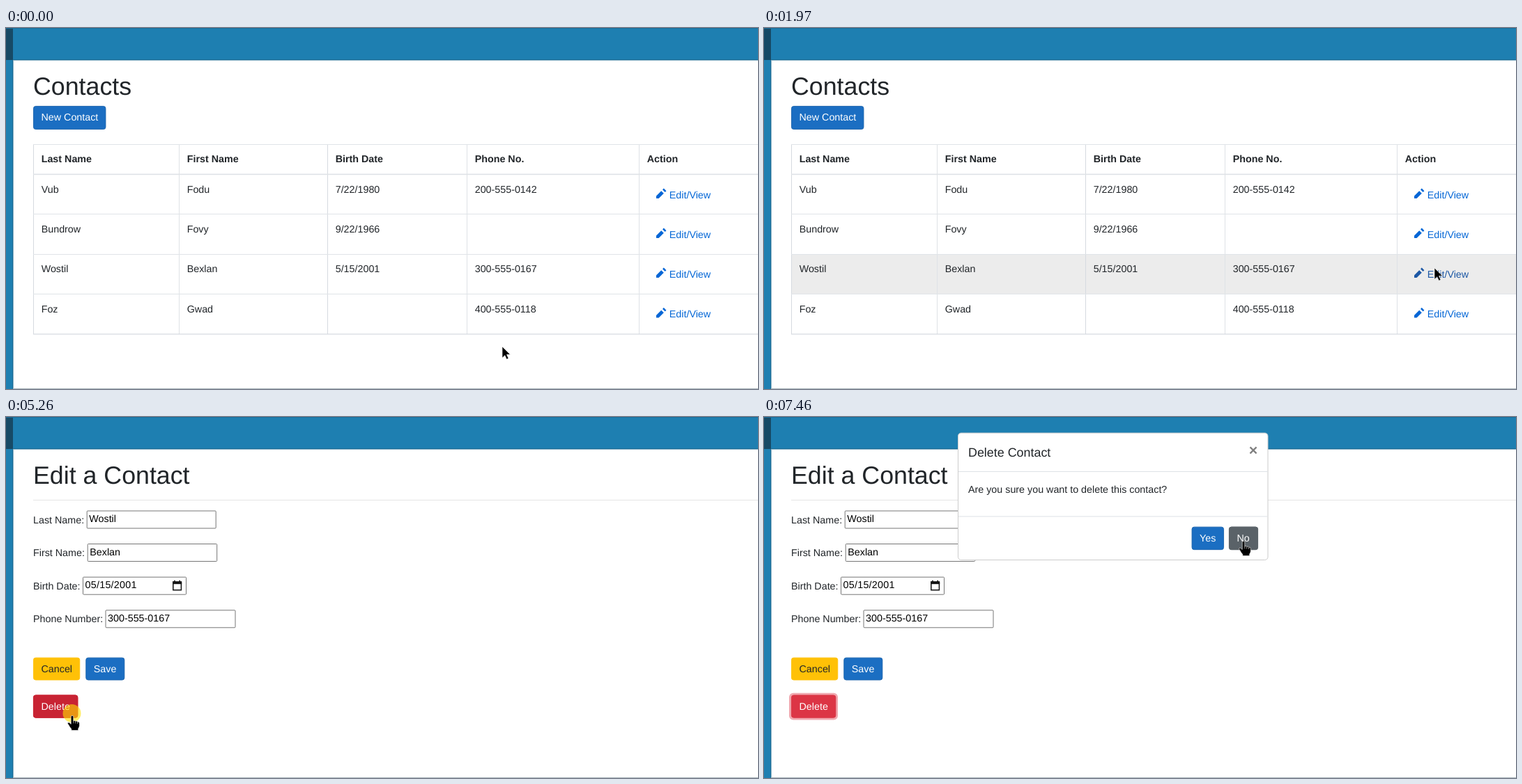
These frames come from a looping animation (1079x519 px, 8 s). An HTML page:

```html
<!DOCTYPE html>
<html lang="en">
<head>
<meta charset="utf-8">
<title>Contacts</title>
<style>
  html, body { margin: 0; width: 100%; height: 100%; overflow: hidden; background: #fff; }
  svg { display: block; width: 1079px; height: 519px; }
  text { font: 14.3px "Liberation Sans", Arial, sans-serif; fill: #212529; white-space: pre; text-rendering: geometricPrecision; }
  .h1 { font-size: 35.75px; }
  .h5 { font-size: 17.9px; }
  .bold { font-weight: bold; }
  .light { fill: #fff; }
  .field { fill: #000; }
  .date { fill: #000; letter-spacing: .25px; }
  .close { font-size: 21.5px; font-weight: bold; fill: #7f7f7f; }
  .link, .link text { fill: #0366d6; }
  .link.on, .link.on text { fill: #1d58a5; }
</style>
</head>
<body>
<svg id="stage" viewBox="0 0 1079 519"></svg>
<script>
const $ = id => document.getElementById(id);

const text = (x, y, s, cls = '') => `<text x="${x}" y="${y}" class="${cls}">${s}</text>`;
const rect = (x, y, w, h, fill, more = '') =>
  `<rect x="${x}" y="${y}" width="${w}" height="${h}" fill="${fill}" ${more}/>`;
const group = (id, body) => `<g id="${id}">${body}</g>`;

function button(x, y, w, h, label, fill, border, cls = 'light', hover = '') {
  const box = (color, more) => rect(x + .45, y + .45, w - .9, h - .9, color, `rx="3.2" ${more}`);
  return box(fill, `stroke="${border}" stroke-width=".9"`) +
    (hover && box(hover, `id="${label}Hover" stroke="${hover}" stroke-width=".9"`)) +
    text(x + 11.5, y + 21.2, label, cls);
}

function field(label, value, x, y, w, cls = 'field') {
  return text(39, y + 18, label) +
    rect(x + .5, y + .5, w - 1, 25, '#fff', 'stroke="#767676" rx="1"') +
    text(x + 3.6, y + 16.7, value, cls);
}

const columns = [39, 248, 461, 661, 908];
const rowTops = [211, 268, 325, 382.5, 440];
const people = [
  ['Vub', 'Fodu', '7/22/1980', '200-555-0142'],
  ['Bundrow', 'Fovy', '9/22/1966', ''],
  ['Wostil', 'Bexlan', '5/15/2001', '300-555-0167'],
  ['Foz', 'Gwad', '', '400-555-0118']
];
const pencil = 'M6 0l-1 1 2 2 1-1-2-2zm-2 2l-4 4v2h2l4-4-2-2z';

function listPage() {
  const heads = ['Last Name', 'First Name', 'Birth Date', 'Phone No.', 'Action'];
  let s = text(39, 96, 'Contacts', 'h1') +
    button(39, 112, 104.4, 34, 'New Contact', '#1b6ec2', '#1861ac') +
    rect(39, 325, 1040, 57, '#ececec', 'id="rowHover"');
  heads.forEach((h, i) => s += text(columns[i] + 11.7, 192.5, h, 'bold'));
  people.forEach((p, r) => {
    const y = rowTops[r];
    p.forEach((v, i) => s += text(columns[i] + 11.7, y + 26.2, v));
    s += `<g class="link" id="link${r}"><path d="${pencil}" transform="translate(933 ${y + 19.6}) scale(1.8)"/>` +
      text(951.8, y + 33.8, 'Edit/View') + '</g>';
  });
  for (const x of columns) s += rect(x, 167, 1, 273, x == 39 || x == 461 ? '#d6dae0' : '#dee2e6');
  for (const y of [167, 267, 325, 382]) s += rect(39, y, 1040, 1, '#e0e4e8');
  return s + rect(39, 209.6, 1040, 1.6, '#dee2e6') + rect(39, 439.5, 1040, 1.2, '#d6dae0');
}

function editPage() {
  const [last, first, , phone] = people[2];
  return text(39, 96, 'Edit a Contact', 'h1') +
    rect(39, 119, 1040, 1, '#e5e5e5') +
    field('Last Name:', last, 115.7, 134.5, 186) +
    field('First Name:', first, 116.7, 182, 186.5) +
    field('Birth Date:', '05/15/2001', 110, 229.7, 149, 'date') +
    field('Phone Number:', phone, 142.5, 277.3, 187) +
    '<path d="M239.8 238.5h11.6v10.2h-11.6z" fill="none" stroke="#111" stroke-width="1.5"/>' +
    rect(239, 236.2, 13.2, 4, '#111') + rect(241.2, 234.8, 1.6, 2, '#111') + rect(248.4, 234.8, 1.6, 2, '#111') +
    button(39, 345.7, 67.2, 32.8, 'Cancel', '#ffc107', '#ffc107', 'dark') +
    button(114.3, 345.7, 56, 32.8, 'Save', '#1b6ec2', '#1861ac') +
    rect(36, 396.8, 70, 38.6, '#f0a9b0', 'rx="6" id="ring"') +
    button(39, 399.5, 64.3, 33.2, 'Delete', '#dc3545', '#dc3545', 'light', '#c82333');
}

function dialogBox() {
  return rect(278.5, 23, 444.5, 182.5, '#fff', 'rx="4.3" stroke="#ccc"') +
    rect(279, 78, 443.5, 1, '#dee2e6') + rect(279, 142.5, 443.5, 1, '#dee2e6') +
    text(293, 56.5, 'Delete Contact', 'h5') + text(695.8, 54.8, '×', 'close') +
    text(293, 109, 'Are you sure you want to delete this contact?') +
    button(613.6, 157.7, 46.4, 33.4, 'Yes', '#1b6ec2', '#1861ac') +
    button(667, 157.7, 42, 33.4, 'No', '#6c757d', '#6c757d', 'light', '#5a6268');
}

const arrow = '<path d="M0 0V16.3L3.8 12.7 6.4 18.3 9 17.1 6.5 11.6H11.6Z" stroke="#fff" stroke-width=".6"/>';
const hand = '<path d="M-1.8 1.2Q0-.6 1.8 1.2V8Q3.6 6.6 4.8 8.4Q6.6 7.4 7.6 9.2Q10.4 8.6 10.4 11.5V15Q10 17.5 8.7 19' +
  'V21.6H-1.2V19.5Q-3.5 17-5 14Q-7.4 11.2-6 10.3Q-4.4 9.4-1.8 12.5Z" stroke="#fff" stroke-width=".6"/>' +
  '<path d="M1.9 8v3.4M4.8 8.6v3M7.6 9.4v2.6" stroke="#fff" stroke-width=".6"/>';

const blue = '#1e7fb1', edge = '#1a6c97', rim = '#8fb6c9';
$('stage').innerHTML =
  rect(0, 0, 1079, 46, blue) + rect(0, 46, 10, 473, blue) + rect(0, 0, 10, 46, '#174a66') +
  rect(0, 0, 1079, 1, edge) + rect(10, 45, 1069, 1, edge) + rect(9, 46, 1, 473, edge) +
  rect(10, 46, 1069, 1, rim) + rect(10, 46, 1, 473, rim) + rect(10, 518, 1069, 1, '#aab5bb') +
  group('list', listPage()) + group('edit', editPage()) + group('dialog', dialogBox()) +
  '<circle id="click" r="13" fill="#ffe100"/>' +
  group('pointer', group('arrow', arrow) + group('hand', hand));

const clamp = v => Math.max(0, Math.min(1, v));
const out = n => u => 1 - (1 - u) ** n;
const linear = u => u;

// start, end, destination, easing of x and of y
const moves = [
  [750, 1520, 962, 345, out(2), out(2.9)],
  [2780, 3560, 144, 454, out(1.6), out(1.45)],
  [3560, 4390, 95, 429, linear, linear],
  [6320, 7090, 630, 224, out(1.23), u => u ** 2.43],
  [7150, 7400, 688, 178, out(1.3), out(1.3)]
];

function pointerAt(t) {
  let x = 712, y = 458;
  for (const [start, end, toX, toY, easeX, easeY] of moves) {
    const u = clamp((t - start) / (end - start));
    x += (toX - x) * easeX(u);
    y += (toY - y) * easeY(u);
  }
  return [x, y];
}

const show = (id, on) => $(id).style.display = on ? '' : 'none';
const fade = (id, v) => $(id).style.opacity = v;
const fadeIn = (t, start) => clamp((t - start) / 150);

const pageSwitch = 2030, dialogOpen = 5430, clicks = [1770, 5260];

function draw(t) {
  const [x, y] = pointerAt(t);
  const onList = t < pageSwitch, asking = t >= dialogOpen;
  show('list', onList);
  show('edit', !onList);
  show('dialog', asking);
  show('ring', asking);

  const row = rowTops.findIndex((top, i) => i < 4 && y >= top && y < rowTops[i + 1]);
  show('rowHover', row >= 0);
  if (row >= 0) $('rowHover').setAttribute('y', rowTops[row]);
  people.forEach((_, i) => $('link' + i).classList.toggle('on', i == row && x > 928));

  fade('DeleteHover', fadeIn(t, 4270) - fadeIn(t, dialogOpen));
  fade('NoHover', fadeIn(t, 7310));

  const pointing = t > 1400 && t < 1970 && x > 928 || t >= 4270 && t < 6320 || t >= 7310;
  show('hand', pointing);
  show('arrow', !pointing);
  $('pointer').setAttribute('transform', `translate(${x} ${y})`);

  const since = Math.min(...clicks.map(c => t < c ? 1e4 : t - c));
  fade('click', .6 * (1 - clamp((since - 40) / 140)));
  $('click').setAttribute('transform', `translate(${x - .5} ${y - 3})`);
}

const begin = performance.now();
function tick() {
  draw((performance.now() - begin) % 8000);
  requestAnimationFrame(tick);
}
tick();
</script>
</body>
</html>
```
